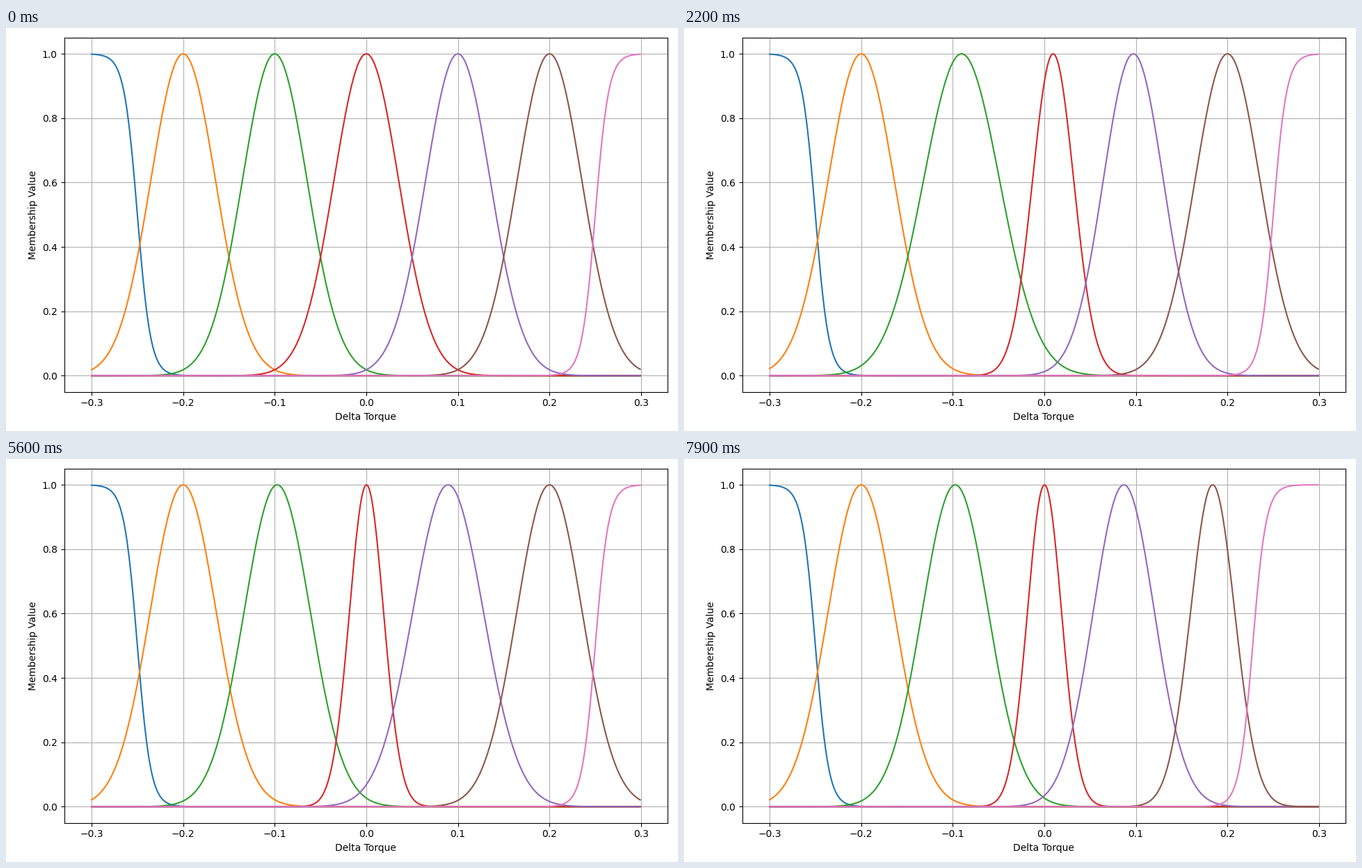
A matplotlib script for the animation above (8000 ms loop, 966 by 580 pixels).

```python
import numpy as np
import matplotlib.pyplot as plt
from matplotlib.animation import FuncAnimation

W, H, DPI = 966, 580, 100
FRAMES, STEP = 80, 100
WIDTH, EDGE, STEEPNESS = 0.05, 0.25, 137

# Each bell: start centre, then (centre, width) shifts learned in each phase
BELLS = [
    (-0.2, dict(swing=(0, 0.002), rest=(0, 0.001))),
    (-0.1, dict(swing=(0.0255, 0.0255), rest=(0.0027, 0.0011))),
    (0.0, dict(swing=(0.0255, -0.0255), rest=(0.0027, -0.0197),
               refine=(-0.0025, -0.004))),
    (0.1, dict(swing=(0.006, -0.0175), rest=(-0.0095, 0.0043),
               refine=(-0.0012, 0.0002), late=(-0.0025, -0.0073))),
    (0.2, dict(rest=(0, 0.0004), late=(-0.0162, -0.0163))),
]
EDGE_SHIFT = -0.0225


def ramp(t, start, end):
    return np.clip((t - start) / (end - start), 0, 1)


def phases(t):
    """Weight of every learning phase at t seconds."""
    u = ramp(t, 1.6, 2.8)
    rest = u * u * (3 - 2 * u)
    return dict(
        swing=(1 - np.exp(-t / 2.1)) * (1 - rest),
        rest=rest,
        refine=1 - np.exp(-max(t - 2.8, 0) / 0.4),
        late=ramp(t, 5.8, 7.9) ** 1.1,
    )


def bell(x, center, width):
    return np.exp(-((x - center) / width) ** 2)


def sigmoid(x, center, steepness):
    return 1 / (1 + np.exp(-steepness * (x - center)))


def memberships(t):
    weight = phases(t)
    yield sigmoid(x, -EDGE, -STEEPNESS)
    for center, shifts in BELLS:
        dc = sum(weight[p] * s[0] for p, s in shifts.items())
        dw = sum(weight[p] * s[1] for p, s in shifts.items())
        yield bell(x, center + dc, WIDTH + dw)
    yield sigmoid(x, EDGE + EDGE_SHIFT * weight["late"], STEEPNESS)


x = np.linspace(-0.3, 0.299, 600)

plt.rcParams["font.family"] = "DejaVu Sans"
fig = plt.figure(figsize=(W / DPI, H / DPI), dpi=DPI, facecolor="white")
left, right, top, bottom = 83.6, 951, 14, 523.5
ax = fig.add_axes([left / W, 1 - bottom / H, (right - left) / W, (bottom - top) / H])
ax.set_xlim(-0.32995, 0.32895)
ax.set_ylim(-0.05, 1.05)
ax.set_xlabel("Delta Torque")
ax.set_ylabel("Membership Value")
ax.grid(True)
lines = [ax.plot(x, y)[0] for y in memberships(0)]


def update(frame):
    for line, y in zip(lines, memberships(frame * STEP / 1000)):
        line.set_ydata(y)
    return lines


anim = FuncAnimation(fig, update, frames=FRAMES, interval=STEP,
                     repeat=True, repeat_delay=0, blit=False)
plt.show()
```
